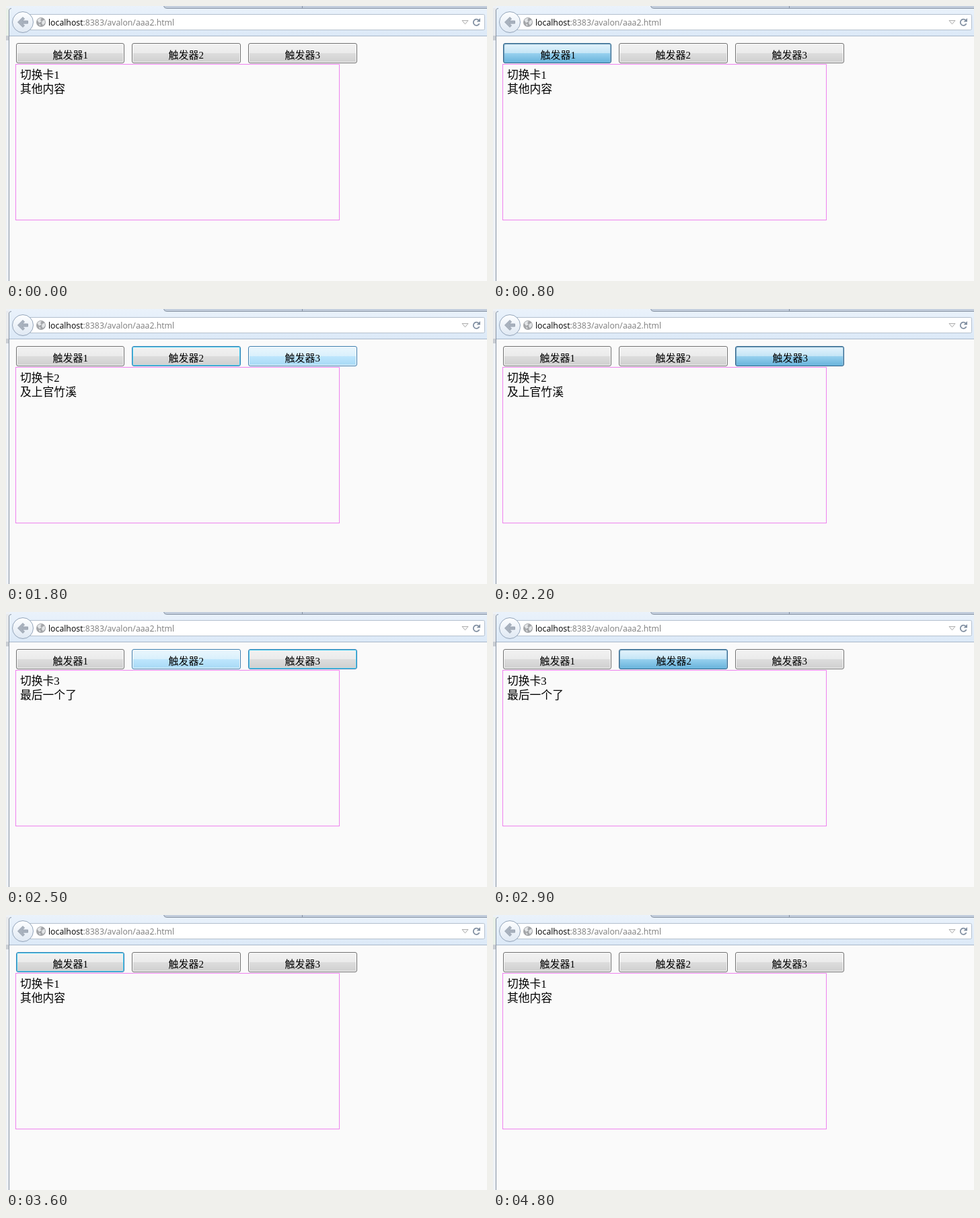
Write an HTML page that moves like this. It is 715x408 px and loops after 4.9 s.

```html
<!DOCTYPE html>
<html lang="zh-CN">
<meta charset="utf-8">
<title>Tabs</title>
<style>
html, body { margin: 0; width: 100%; height: 100%; overflow: hidden; background: #fafafa; }
svg, .btn, #card { position: absolute; box-sizing: border-box; }
svg { left: 0; top: 0; }
.url { font: 12.3px "Open Sans", "Noto Sans", sans-serif; }
.btn, #card { font-family: "Liberation Serif", "Noto Sans CJK SC", "Noto Sans CJK", serif; font-weight: 300; color: #000; white-space: pre; }
.btn {
  top: 55px; height: 30px; border: 1px solid #707070; border-radius: 3px;
  font-size: 15px; line-height: 35px; text-indent: 53.5px;
  background: linear-gradient(#f2f2f2, #ebebeb 50%, #dddddd 50%, #cfcfcf);
  box-shadow: inset 0 0 0 1px #fbfbfb;
}
.h { border-color: #3c7fb1; background: linear-gradient(#eaf6fd, #d9f0fc 50%, #bee6fd 50%, #a7d9f5); }
.p {
  border-color: #2c628b; text-indent: 54.5px;
  background: linear-gradient(#e5f4fc, #c4e5f6 50%, #98d1ef 50%, #68b3db);
  box-shadow: inset 1px 1px 1px #6f9db9, inset -1px 0 1px #8fb9d2;
}
.f { border-color: #3c7fb1; box-shadow: inset 0 0 0 1px #43cdf2; }
#card {
  left: 14px; top: 86px; width: 482px; height: 232px; border: 1px solid #ee82ee;
  padding: 5px 6px; font-size: 16.8px; line-height: 21px;
}
</style>
<body>
<svg width="715" height="408">
  <defs>
    <linearGradient id="bar" x2="0" y2="1"><stop stop-color="#eaf2fb"/><stop offset="1" stop-color="#dce9f7"/></linearGradient>
    <linearGradient id="disc" x2="0" y2="1"><stop stop-color="#fdfeff"/><stop offset="1" stop-color="#dfe8f3"/></linearGradient>
  </defs>
  <path fill="#eef1f5" d="M0 0H5V408H0z"/>
  <path id="edge" d="M0 3H4V44H0z"/>
  <path fill="#c9cdd3" d="M0 44H4V51H0z"/>
  <path fill="url(#bar)" d="M5 0H715V44H5z"/>
  <path fill="#c3cedd" d="M235 0H715V3H238Q235 3 235 0z"/>
  <path fill="none" stroke="#8793a3" d="M234.5 0Q235 3.5 239 3.5H715M440.5 0V3M4.5 408V6Q4.5 4 8 3.5"/>
  <path stroke="#a9b8ca" d="M5 44.5H715"/>
  <rect x="32.5" y="12.5" width="679" height="23" rx="2" fill="#fff" stroke="#b4c0ce"/>
  <circle cx="25" cy="24" r="15.5" fill="url(#disc)" stroke="#94a5ba"/>
  <path fill="#a9b2be" stroke="#8e99a8" stroke-width=".8" d="M17.5 24L25 16.5L27.5 19L24.5 22H32.5V26H24.5L27.5 29L25 31.5z"/>
  <circle cx="52" cy="24" r="7" fill="#a3a5a8"/>
  <path fill="#e3e5e7" d="M46.5 21Q49 17 53 18.5L51 21L53 23L49 25zM54 22L57.5 20.5L58 25L55 28.5L53 25.5zM48.5 26L51.5 27.5L50.5 30z"/>
  <text class="url" x="63" y="28.5">localhost<tspan fill="#7c7c7c">:8383/avalon/aaa2.html</tspan></text>
  <path fill="#f6f6f6" stroke="#b0b0b0" d="M678 21.5H687L682.5 27z"/>
  <path fill="none" stroke="#8290a2" stroke-width="1.8" d="M702.6 21A4.6 4.6 0 1 0 703.6 26"/>
  <path fill="#8290a2" d="M705 18V23.5H699.5z"/>
</svg>
<div id="card"></div>
<script>
const cards = ["切换卡1\n其他内容", "切换卡2\n及上官竹溪", "切换卡3\n最后一个了"];
// start time, look of each button (n normal, h hover, p pressed, f focused), visible card
const steps = [
  [0, "nnn", 0], [400, "hnn", 0], [800, "pnn", 0], [900, "hnn", 0], [1000, "fhn", 0],
  [1500, "npn", 0], [1600, "nhn", 1], [1800, "nfh", 1], [2200, "nnp", 1], [2300, "nnh", 2],
  [2500, "nhf", 2], [2900, "npn", 2], [3000, "nhn", 1], [3100, "hfn", 1],
  [3400, "pnn", 1], [3500, "hnn", 0], [3600, "fnn", 0], [4700, "nnn", 0]
];
const card = document.getElementById("card");
const edge = document.getElementById("edge");
const buttons = [[15, 161], [187, 162], [360, 162]].map(([x, w], i) => {
  const b = document.createElement("div");
  b.textContent = "触发器" + (i + 1);
  b.style.left = x + "px";
  b.style.width = w + "px";
  document.body.append(b);
  return b;
});

function draw(now) {
  const t = now % 4900;
  const [, looks, shown] = steps.findLast(s => s[0] <= t);
  buttons.forEach((b, i) => b.className = "btn " + looks[i]);
  card.textContent = cards[shown];
  edge.setAttribute("fill", t < 800 || t >= 4800 ? "#e9f0e8" : "#e8eaed");
}

const start = performance.now();
function tick() {
  draw(performance.now() - start);
  requestAnimationFrame(tick);
}
tick();
</script>
</body>
</html>
```
